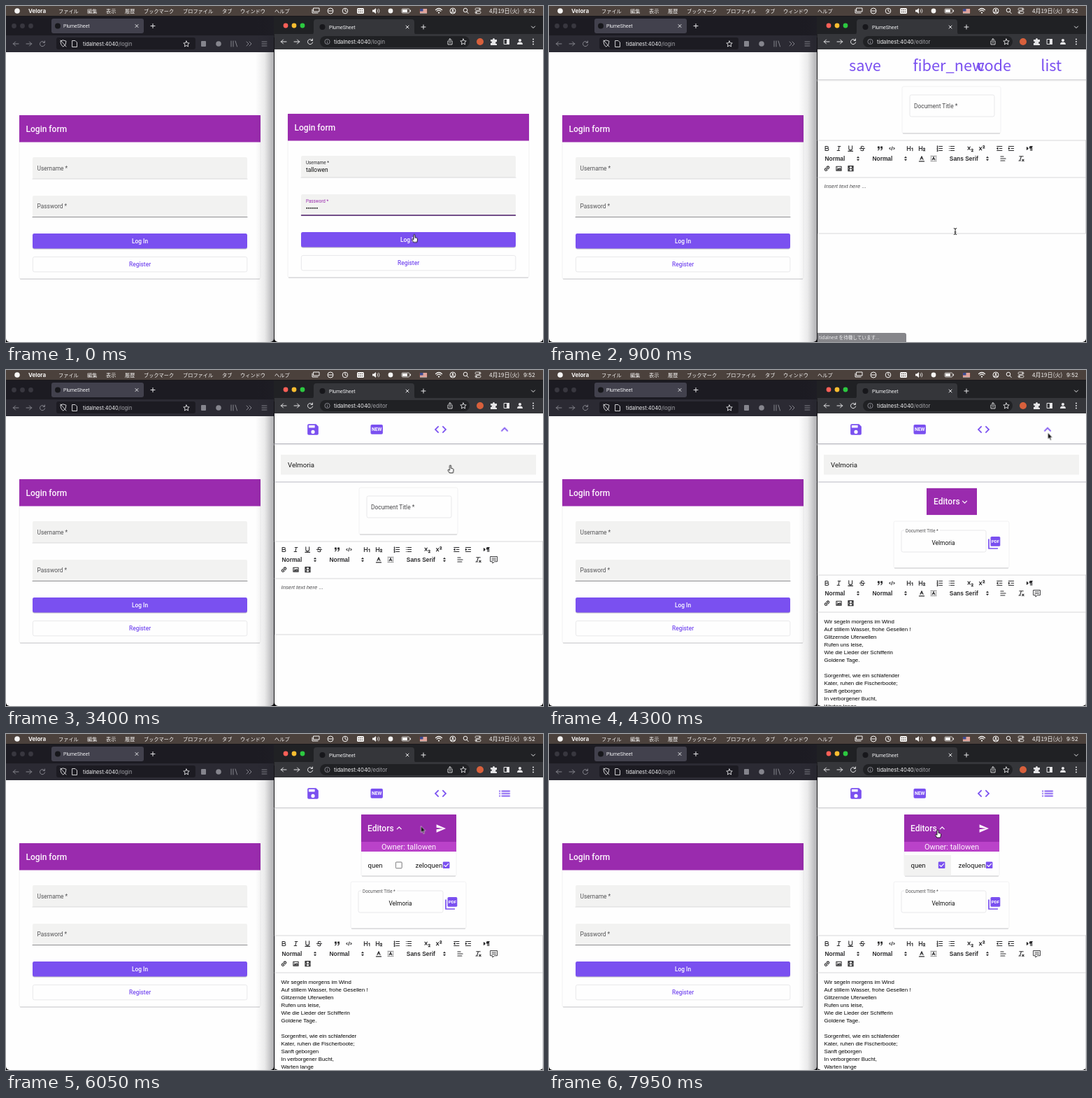
Recreate the animation shown at these times as an HTML page. Size 768 px wide and 480 px high, loop 8 s.

```html
<!DOCTYPE html>
<html lang="ja">
<head>
<meta charset="utf-8">
<title>Shared editor</title>
<style>
  html, body { margin: 0; width: 100%; height: 100%; overflow: hidden; background: #000; }
  svg { display: block; width: 100vw; height: 100vh; }
  text { font-family: Roboto, Arial, sans-serif; white-space: pre; }
  .ui { font-family: Inter, Roboto, sans-serif; }
  .jp { font-family: "Noto Sans CJK JP", "Noto Sans CJK", sans-serif; }
  .arial { font-family: "Liberation Sans", Arial, sans-serif; }
  .line { fill: none; stroke: currentColor; stroke-linecap: round; stroke-linejoin: round; }

  /* Page content below the optional panels */
  .sheet { animation: sheet 8s step-end infinite; }
  @keyframes sheet {
    0% { transform: translateY(0); }
    36.25% { transform: translateY(53px); }
    46.875% { transform: translateY(101px); }
    56.25% { transform: translateY(48px); }
    75%, 100% { transform: translateY(96px); }
  }
  .editors { animation: editors 8s step-end infinite; }
  @keyframes editors {
    0% { transform: translateY(53.6px); }
    56.25%, 100% { transform: translateY(0); }
  }
  .cursor { animation: cursor 8s ease-in-out infinite; }
  @keyframes cursor {
    0%, 4% { transform: translate(584px, 326.5px); }
    7%, 12.5% { transform: translate(581px, 322px); }
    21.25% { transform: translate(665px, 132px); }
    26.25%, 35.6% { transform: translate(721.5px, 83.5px); }
    41.9%, 45% { transform: translate(635.5px, 136px); }
    52.5%, 54% { transform: translate(713.5px, 89.5px); }
    56%, 63% { transform: translate(715px, 87px); }
    73.75%, 76.9% { transform: translate(593.5px, 131.5px); }
    82.5%, 90% { transform: translate(561px, 186px); }
    95.6%, 98% { transform: translate(558px, 147px); }
    99.3%, 100% { transform: translate(556px, 137px); }
  }
</style>
</head>
<body>
<svg id="stage" viewBox="0 0 768 480" preserveAspectRatio="none"></svg>
<script>
const PAGE = '#fefefe', FIELD = '#f2f2f1', EDGE = '#e4e4e6', RULE = '#d0d0d2', INK = '#2c2c2e';
const HEAD = '#9a2bae', ACCENT = '#7a50f0', PALE = '#e6e6e8', DIM = '#85858d', MENU = '#4b413c';
const LOOP = 8000;
let css = '', phases = 0;

const rect = (x, y, w, h, fill, more = '') =>
  `<rect x="${x}" y="${y}" width="${w}" height="${h}" fill="${fill}" ${more}/>`;
const dot = (x, y, r, fill, more = '') => `<circle cx="${x}" cy="${y}" r="${r}" fill="${fill}" ${more}/>`;
const label = (x, y, size, str, fill = INK, more = '') =>
  `<text x="${x}" y="${y}" font-size="${size}" fill="${fill}" ${more}>${str}</text>`;
const MID = 'text-anchor="middle"', MEDIUM = 'font-weight="500"', BOLD = 'font-weight="700"';
const line = (d, color = PALE, width = 1, more = '') =>
  `<path class="line" d="${d}" style="color:${color}" stroke-width="${width}" ${more}/>`;
const at = (x, y, scale, body) => `<g transform="translate(${x} ${y}) scale(${scale})">${body}</g>`;
const outline = (x, y, w, h, r = 2.4, color = EDGE) =>
  rect(x, y, w, h, 'none', `rx="${r}" stroke="${color}" stroke-width=".8"`);
const card = (x, y, w, h) =>
  outline(x, y, w, h, 2.4, '#efeff0') + line(`M${x + 1.5} ${y + h}H${x + w - 1.5}`, '#c8c8ca', 1);

// Shows a group only inside the given [from, to] spans of the loop, in ms
function during(body, ...spans) {
  const name = 'phase' + phases++;
  const steps = spans.map(([a, b]) =>
    `${a / LOOP * 100}%{opacity:1}${b / LOOP * 100}%{opacity:0}`).join('');
  css += `@keyframes ${name}{0%{opacity:0}${steps}}`;
  return `<g style="animation:${name} ${LOOP}ms step-end infinite">${body}</g>`;
}

function menuBar() {
  const menus = [[75, 'ファイル'], [116, '編集'], [143, '表示'], [170, '履歴'], [197, 'ブックマーク'],
    [253, 'プロファイル'], [309, 'タブ'], [335, 'ウィンドウ'], [384, 'ヘルプ']];
  const white = '#f6f5f4';
  return rect(0, 0, 768, 15, MENU) + dot(16, 7, 3.8, white) +
    label(32, 9.8, 8, 'Velora', white, `class="ui" ${BOLD}`) +
    menus.map(([x, s]) => label(x, 9.7, 7.2, s, white, 'class="jp"')).join('') +
    line('M440 3h8v5h-8zM438 5v5h8', white) +
    dot(464, 7, 4, 'none', `stroke="${white}"`) + line('M461 7h6', white) +
    dot(485, 7, 3.8, 'none', `stroke="${white}"`) + line('M485 4.5V7l2 1', white) +
    rect(502, 3, 10, 8, white, 'rx="1.5"') + line('M504 5.5h6M504 8.5h6', MENU, 1, 'stroke-dasharray="1 1.6"') +
    `<path d="M524 5.5h2l3-2.5v8l-3-2.5h-2z" fill="${white}"/>` + line('M531 5q1.5 2 0 4M533 4q2.4 3 0 6', white, .8) +
    dot(550, 7, 3.4, white) +
    outline(566, 4, 11, 6, 1.4, white) + rect(567, 5, 7, 4, white) + line('M578.5 6v2', white) +
    rect(592, 4, 10, 6.5, '#f2ecea') + line('M592 5h10M592 7h10M592 9h10', '#c84a3c', .9) + rect(592, 4, 4.5, 3.5, '#3b4a90') +
    line('M614.5 5.5q4.5-4 9 0M616.2 7.4q2.8-2.4 5.6 0', white, 1.2) + dot(619, 9.6, 1.1, white) +
    dot(639, 7, 4, 'none', `stroke="${white}"`) + dot(639, 5.8, 1.4, white) + line('M636.5 9.3q2.5-2 5 0', white, 1.2) +
    dot(657, 6, 2.8, 'none', `stroke="${white}"`) + line('M659 8.2l2.2 2.4', white) +
    outline(671, 3, 8, 3.2, 1.6, white) + outline(671, 7.6, 8, 3.2, 1.6, white) + dot(677.3, 4.6, 1, white) + dot(672.8, 9.2, 1, white) +
    label(691, 10, 8.1, '4月19日(火)', white, 'class="jp"') + label(740, 10, 8, '9:52', white, 'class="ui"');
}

const arrows = (x, y, step, dimFrom) => [
  'M-3.5 0H4M-3.5 0L-.5-3M-3.5 0L-.5 3', 'M3.5 0H-4M3.5 0L.5-3M3.5 0L.5 3',
  'M3-2A3.6 3.6 0 1 0 3.6 1M3.4-4V-1.6H1'
].map((d, i) => at(x + i * step, y, 1, line(d, i >= dimFrom ? DIM : PALE))).join('');
const cross = (x, y) => line(`M${x - 2} ${y - 2}l4 4m0-4l-4 4`);
const plus = (x, y) => line(`M${x - 3} ${y}h6m-3-3v6`);
const star = (x, y) => at(x, y, 1, line('M0-4L1.2-1.3L4.2-1L2 1L2.6 4L0 2.4L-2.6 4L-2 1L-4.2-1L-1.2-1.3Z', PALE, .9));
const address = (x, y, size, path) =>
  label(x, y, size, `tidalnest:4040<tspan fill="#a4a4a9">/${path}</tspan>`, '#f2f2f4', 'class="ui"');

function loginForm(dx, dy, filled) {
  const field = y => rect(38, y, 307, 31, FIELD, 'rx="2"');
  const body = rect(19, 156, 345, 234, PAGE) + card(19, 156, 345, 234) + rect(19, 156, 345, 38.5, HEAD) +
    label(28.5, 179.7, 12, 'Login form', '#fdf6fd', MEDIUM) + field(216) + field(271) +
    line('M38 247H345', RULE, .8) +
    (filled
      ? line('M38.5 301H344.5', '#4a1868', 1.5) + label(45, 228, 6.3, 'Username *') + label(45, 239, 8.4, 'tallowen', '#111') +
        label(45, 282.8, 6.3, 'Password *', HEAD) +
        [0, 1, 2, 3, 4, 5].map(i => dot(46.3 + i * 2.9, 290.8, 1, '#111')).join('')
      : line('M38 301.5H345', '#77777a', .8) + label(44.5, 234.8, 8.4, 'Username *', '#555557') +
        label(44.5, 289.3, 8.4, 'Password *', '#555557')) +
    rect(38, 326, 307, 21.6, '#c2c2c6', 'rx="2.4"') + rect(38, 325, 307, 21.5, ACCENT, 'rx="2.4"') +
    label(191.5, 338.8, 8.4, 'Log In', '#fdfdff', `${MID} ${MEDIUM}`) +
    outline(38.4, 358.4, 306.4, 21.4) + label(191.5, 372.3, 8.4, 'Register', ACCENT, `${MID} ${MEDIUM}`);
  return `<g transform="translate(${dx} ${dy})">${body}</g>`;
}

function leftWindow() {
  const lamps = [11.5, 23.5, 35.5].map(x => dot(x, 28.5, 3.4, '#38373f')).join('');
  return rect(0, 15, 383, 465, PAGE, 'rx="5"') + rect(0, 15, 383, 27, '#1c1b22') + rect(0, 42, 383, 24, '#2b2a33') + lamps +
    rect(65, 18, 132, 21, '#42414d', 'rx="3"') + dot(74, 28.5, 4, '#17171b') +
    label(82, 31, 7, 'PlumeSheet', '#f0f0f2') + cross(187, 28.5) + plus(210, 28.5) +
    arrows(14, 54, 19, 0) + rect(72, 45, 199, 17, '#1c1b22', 'rx="3"') +
    line('M82 49l4 1.2q0 6-4 8q-4-2-4-8zM78 49l8 9', PALE, .9) + line('M95 49.5h4l2.5 2.5v6.5h-6.5z', PALE, .9) +
    address(110, 56.8, 7.4, 'login') + star(258, 54) +
    rect(279, 50, 7, 8, DIM, 'rx="1"') + dot(304, 54, 3.8, DIM) +
    line('M322 50v8M325 50v8M328 50l2.5 8M344 51l3 3l-3 3M348 51l3 3l-3 3M366 51h7M366 54h7M366 57h7', DIM) +
    loginForm(0, 0, false) + rect(357, 15, 26, 465, 'url(#shade)');
}

function browserBar() {
  const lamps = ['#ff5f57', '#f8bd30', '#2cc840'].map((c, i) => dot(400 + i * 12, 28, 3.4, c)).join('');
  return rect(383, 15, 385, 30, '#202124') + rect(384, 40, 384, 22, '#35363a') + lamps +
    '<path d="M436 41q4 0 4-4V23q0-4 4-4h136q4 0 4 4v14q0 4 4 4z" fill="#35363a"/>' +
    dot(452.5, 30, 4, '#17171b') + label(462, 32.5, 7, 'PlumeSheet', '#f0f0f2') +
    cross(574, 30) + plus(597, 30) + line('M751.5 29l2.5 2.5l2.5-2.5') +
    arrows(397, 51, 19, 3) + rect(449, 43, 214, 16, '#202124', 'rx="8"') +
    dot(459.5, 51, 3.6, 'none', `stroke="${DIM}"`) + line('M459.5 51v2M459.5 49.2v0', DIM) +
    during(address(469, 53.8, 7.7, 'login'), [0, 450]) + during(address(469, 53.8, 7.7, 'editor'), [450, LOOP]) +
    line('M633 50h-1v5h6v-5h-1M635 53v-6M633 48.5l2-2l2 2', PALE, .9) + star(654, 51) + dot(678, 51, 5, '#d8603c') +
    `<path d="M693 48h3q0-2 1.5-2t1.5 2h3v3q-2 0-2 1.5t2 1.5v2h-9v-3q2 0 2-1.3t-2-1.3z" fill="${PALE}"/>` +
    line('M712.5 47.5h7v7h-7z') + rect(716, 47, 4, 8, PALE) +
    dot(735, 49, 2.1, PALE) + `<path d="M731 55q0-3.4 4-3.4t4 3.4z" fill="${PALE}"/>` +
    [47.5, 51, 54.5].map(y => dot(754, y, 1, PALE)).join('');
}

const glyph = (x, y, d, scale = .87, fill = ACCENT) =>
  at(x, y, scale, `<path transform="translate(-12 -12)" fill="${fill}" fill-rule="evenodd" d="${d}"/>`);
const UP = 'M12 8l-6 6 1.4 1.4L12 10.8l4.6 4.6L18 14z', DOWN = 'M12 16l-6-6 1.4-1.4L12 13.2l4.6-4.6L18 10z';
const LIST = 'M3 7h2v2H3zM3 11h2v2H3zM3 15h2v2H3zM7 7h14v2H7zM7 11h14v2H7zM7 15h14v2H7z';

function actionBar() {
  const names = ['save', 'fiber_new', 'code', 'list'];
  const words = names.map((s, i) => label(429 + i * 91.4, 93, 21.8, s, ACCENT, 'class="jp" font-weight="300"')).join('');
  const icons =
    glyph(439, 85, 'M17 3H5Q3 3 3 5v14q0 2 2 2h14q2 0 2-2V7zM12 19a3 3 0 1 1 0-6a3 3 0 1 1 0 6zM15 9H5V5h10z') +
    rect(521.5, 78, 17.4, 13.8, ACCENT, 'rx="1.8"') + label(530.2, 87.4, 6.8, 'NEW', PAGE, `${MID} ${BOLD}`) +
    glyph(621.5, 85, 'M9.4 16.6L4.8 12l4.6-4.6L8 6l-6 6 6 6zM14.6 16.6l4.6-4.6-4.6-4.6L16 6l6 6-6 6z');
  return during(words, [450, 1300]) + during(icons, [1300, LOOP]) +
    during(dot(713, 85, 17, '#efeff1'), [2000, 2950], [4400, 5100]) +
    during(glyph(713, 85, LIST), [1300, 2900], [4500, LOOP]) + during(glyph(713, 85, UP), [2900, 4500]) +
    line('M384 105.5H768', '#cbcbce', 1) + line('M384 107H768', '#ededee', 1) +
    during(line('M384 105.5H768M384 160H768', '#a9a9b4', .8) + rect(393, 121, 365, 28.5, FIELD) +
      label(403, 138.5, 9.6, 'Velmoria', '#161616'), [2900, 4500]);
}

const HBAR = 'M3 4V14M10 4V14M3 9H10', TWO = 'q0-1.8 1.8-1.8t1.8 1.8q0 1.6-3.6 4.2h4';
const CELL = 'M3 4H15M3 14H15M9 9H15';
const TOOLS = [
  [397.5, 203.5, 'M5 4H9.5a2.5 2.5 0 0 1 0 5H5zM5 9h5.5a2.5 2.5 0 0 1 0 5H5z'],
  [414.5, 203.5, 'M7 4h6M5 14h6M8 14L10 4'],
  [431.2, 203.5, 'M5 3v6a4 4 0 0 0 8 0V3M3.5 15.5h11'],
  [448, 203.5, 'M12.5 5.5Q12 3.5 9 3.5C5 3.5 5 8 9 9C13.5 10 13 14.5 9 14.5Q5.5 14.5 5.3 12M3 9h12'],
  [473.5, 203.5, 'M4 5h3v3H4zM11 5h3v3h-3zM7 8q0 4-3 5M14 8q0 4-3 5', 1],
  [490.5, 203.5, 'M5 7L3 9l2 2M13 7l2 2l-2 2M10 5L8 13'],
  [516, 203.5, HBAR + 'M13.5 9L15.5 8v6.5'],
  [533, 203.5, HBAR + 'M13 10.2' + TWO],
  [559, 203.5, 'M7 4h8M7 9h8M7 14h8M2.5 3.8l1-.8v3M2.5 8h1.3l-1.3 2h1.4M2.5 12.5h1.4v3h-1.4'],
  [576, 203.5, 'M6 4h9M6 9h9M6 14h9M3 4v0M3 9v0M3 14v0'],
  [602, 203.5, 'M4 5l5.5 7M9.5 5l-5.5 7M12.6 12' + TWO],
  [618.5, 203.5, 'M4 6l5.5 7M9.5 6l-5.5 7M12.6 4' + TWO],
  [644.3, 203.5, CELL + 'M5 7v4L3 9z'],
  [661, 203.5, CELL + 'M3 7v4L5 9z'],
  [687, 203.5, 'M3 6l3 3l-3 3zM12 4v10M15 4v10M16 4h-4a2.5 2.5 0 0 0 0 5z', 1],
  [533, 218, 'M5.5 11.5L9 3.5l3.5 8M7 9h4M3 15.5h12'],
  [550, 218, 'M6 12l3-7l3 7M7.2 10h3.6M3 3v0M6 3v0M9 3v0M12 3v0M15 3v0M3 6v0M15 6v0M3 9v0M15 9v0M3 12v0M15 12v0M3 15v0M6 15v0M9 15v0M12 15v0M15 15v0'],
  [649.5, 218, 'M3 4h7M3 9h12M3 14h10'],
  [675.5, 218, 'M4.5 3.5h9M5.5 14L9 3.5M11 11l4 4M15 11l-4 4M3 14h4'],
  [397.5, 232.2, 'M8 6l1.5-1.5a2.7 2.7 0 0 1 4 4L12 10M10 12l-1.5 1.5a2.7 2.7 0 0 1-4-4L6 8M7 11l4-4'],
  [414.5, 232.2, 'M3 4h12v10H3zM6 7v0M5 12l2.5-3l1.5 1.5L11.5 8L13 10v2z'],
  [431.5, 232.2, 'M3 3h12v12H3zM5.5 3v12M12.5 3v12M5.5 9h7M3 6h2M3 12h2M13 6h2M13 12h2'],
  ...[442, 510, 627].map(x => [x, 218, 'M7 11l2 2l2-2zM7 7l2-2l2 2z', 1])
];

function toolbar() {
  const tools = TOOLS.map(([x, y, d, solid]) => at(x, y, .6,
    `<path class="line" style="color:${INK};fill:${solid ? INK : 'none'}" stroke-width="1.8" transform="translate(-9 -9)" d="${d}"/>`)).join('');
  const selects = [[394.5, 'Normal'], [462.5, 'Normal'], [572.8, 'Sans Serif']]
    .map(([x, s]) => label(x, 221, 8.4, s, INK, `class="arial" ${BOLD}`)).join('');
  const comment = line('M693 213.5h9.5v7.2h-4l-2.6 2.4v-2.4H693zM695 216h5.5M695 218.4h5.5', INK, .9);
  return line('M384.5 192V245M767.5 192V245M384 192H768M384 245H768', RULE, .8) + tools + selects + during(comment, [1300, LOOP]);
}

const POEM = ['Wir segeln morgens im Wind', 'Auf stillem Wasser, frohe Gesellen !', 'Glitzernde Uferwellen',
  'Rufen uns leise,', 'Wie die Lieder der Schifferin', 'Goldene Tage.', '', 'Sorgenfrei, wie ein schlafender',
  'Kater, ruhen die Fischerboote;', 'Sanft geborgen', 'In verborgener Bucht,', 'Warten lange', 'Und blinken'];

function sheet() {
  const blank = card(505, 115, 141, 67) + outline(516, 127, 121, 31) + label(522, 145.8, 8.4, 'Document Title *', '#4a4a4c') +
    line('M384.5 245V325H767.5V245', RULE, .8) +
    label(393.5, 260.3, 7.78, 'Insert text here ...', '#4a4a4c', 'class="arial" font-style="italic"');
  const pdf = `<path d="M629 140.5v13.5h13" fill="none" stroke="${ACCENT}" stroke-width="1.7"/>` +
    rect(631.5, 137, 13.8, 13.8, ACCENT, 'rx="1.6"') + label(638.4, 146.3, 6.2, 'PDF', PAGE, `${MID} ${BOLD}`);
  const loaded = card(493, 115, 165, 67) + outline(504, 128, 121, 31) + rect(508, 126, 51, 4, PAGE) +
    label(510, 130.8, 6.3, 'Document Title *', '#58585a') + label(564, 148.5, 8.4, 'Velmoria', '#111', MID) + pdf +
    line('M384.5 245V480M767.5 245V480', RULE, .8) +
    POEM.map((s, i) => label(393.5, 260.6 + i * 11.05, 7.85, s, '#000', 'class="arial"')).join('');
  return `<g class="sheet">${during(blank, [450, 3750])}${during(loaded, [3750, LOOP])}${toolbar()}</g>`;
}

function editorsPanel() {
  const title = x => label(x, 138.6, 12, 'Editors', '#fdf6fd', MEDIUM);
  const checked = x => rect(x, 182.5, 9.6, 9.6, ACCENT, 'rx="1.2"') + line(`M${x + 2} 187.4l2 2l3.8-4`, PAGE, 1.2);
  const closed = rect(540, 115, 72, 38.5, HEAD) + title(550) + glyph(594.5, 135, DOWN, .62, '#fdf6fd');
  const open = card(508, 115, 136, 88) + rect(508, 115, 136, 39, HEAD) + title(517) + glyph(562.3, 134.5, UP, .62, '#fdf6fd') +
    glyph(622, 135, 'M2 21L23 12 2 3v7l15 2-15 2z', .64, '#fdf6fd') + rect(508, 154, 136, 14, '#ba42c9') +
    label(576, 164.8, 11, 'Owner: tallowen', '#fdf4fd', MID) +
    during(rect(508, 173, 67, 29.5, FIELD), [6500, LOOP]) +
    label(517.5, 190.6, 9.6, 'quen', '#161616') + label(585.5, 190.6, 9.6, 'zeloquen', '#161616') +
    during(outline(557.4, 183, 8.8, 8.8, 1, '#555557'), [6000, 7000]) + during(checked(556.8), [7000, LOOP]) + checked(624.8);
  return `<g class="editors">${during(closed, [3750, 6000])}${during(open, [6000, LOOP])}</g>`;
}

function cursor() {
  const hand = '<path d="M-1 1a1 1 0 0 1 2 0V4.3L3.6 5Q4.8 5.4 4.6 7L3.8 11H-1.2L-3.4 7.6Q-3.4 6-2 6.6L-1 7.4Z" fill="#fff" stroke="#111" stroke-width=".9"/>';
  const arrow = '<path d="M0 0V9.3L2.1 7.4L3.6 11L5 10.4L3.6 6.9H6.4Z" fill="#111" stroke="#fff" stroke-width=".6"/>';
  const beam = line('M-1.8-4.5Q0-4.5 0-3Q0-4.5 1.8-4.5M0-3V3M-1.8 4.5Q0 4.5 0 3Q0 4.5 1.8 4.5M-1 1h2', '#111', .9);
  return '<g class="cursor">' + during(beam, [450, 1200]) +
    during(hand, [0, 450], [1950, 2950], [3200, 3850], [4400, 5150], [5800, 6000], [6550, 7250], [7900, LOOP]) +
    during(arrow, [1200, 1950], [2950, 3200], [3850, 4400], [5150, 5800], [6000, 6550], [7250, 7900]) + '</g>';
}

const status = '<path d="M384 467h124q3 0 3 3v10H384z" fill="#86868a"/>' +
  label(386, 476.2, 6.6, 'tidalnest を待機しています...', '#f2f2f4', 'class="jp"');
const editor = sheet() + editorsPanel() + actionBar();

document.getElementById('stage').innerHTML =
  `<defs><linearGradient id="shade">
    <stop offset="0" stop-color="#202028" stop-opacity="0"/>
    <stop offset=".5" stop-color="#202028" stop-opacity=".09"/>
    <stop offset="1" stop-color="#202028" stop-opacity=".36"/>
  </linearGradient></defs>` +
  leftWindow() + rect(383, 15, 1, 465, '#131316') + rect(384, 40, 384, 440, PAGE, 'rx="5"') +
  during(loginForm(384, -2, true), [0, 450]) + during(editor, [450, LOOP]) +
  during(status, [450, 1250]) + browserBar() + menuBar() + rect(0, 14, 768, 1, '#19181b') + cursor();
document.head.appendChild(document.createElement('style')).textContent = css;
</script>
</body>
</html>
```
